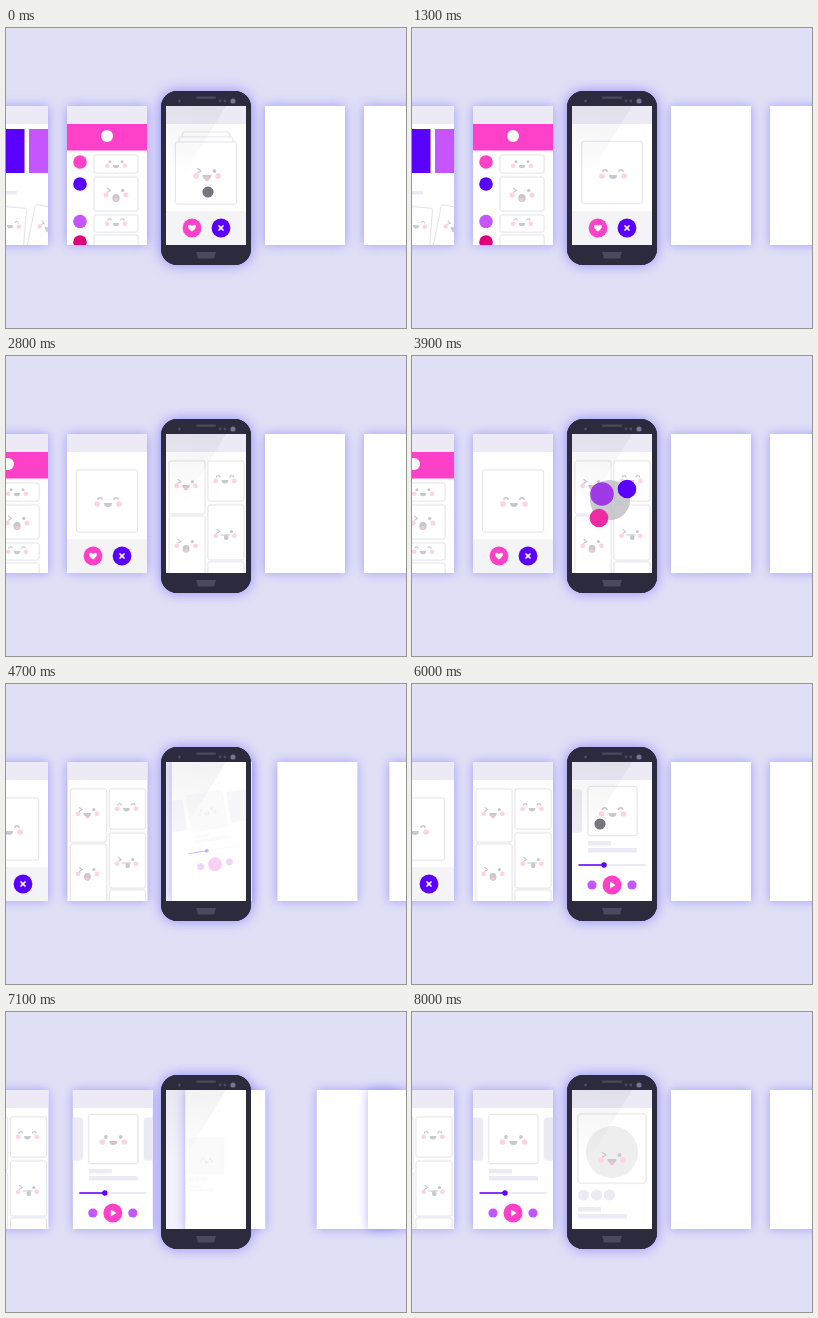
Write an HTML page with a canvas that moves like this. It is 400x300 px and loops after 8.1 s.

```html
<!DOCTYPE html>
<html lang="en">
<head>
<meta charset="utf-8">
<title>App screens</title>
<style>
html, body { margin: 0; width: 100%; height: 100%; overflow: hidden; background: #dfdff6; }
canvas { display: block; width: 100vw; height: 100vh; }
</style>
</head>
<body>
<canvas></canvas>
<script>
const LOOP = 8100, PITCH = 99, W = 80, H = 139, TOP = 78;
const PINK = '#ff40c8', BLUE = '#5a00ff', VIOLET = '#c455ff', RED = '#de0078';
const PALE = '#ecebf5', GREY = '#c9c8d0', DARK = '#2c2b3d', TRIM = '#4a4960';

// Each slide: start time and the delay of every column from left to right
const SLIDES = [
  { start: 1974, delay: [0, 56, 79, 102, 125] },
  { start: 4287, delay: [0, 56, 112, 140, 174] },
  { start: 6743, delay: [0, 56, 104, 161, 44] }
];
const SLIDE_MS = 400;

const canvas = document.querySelector('canvas');
const c = canvas.getContext('2d');
let t = 0;

const clamp = v => Math.max(0, Math.min(1, v));
const inOut = p => p < .5 ? 4 * p ** 3 : 1 - 4 * (1 - p) ** 3;
const part = (a, b) => clamp((t - a) / (b - a));
const ease = (a, b) => inOut(part(a, b));
const easeOut = (a, b) => 1 - (1 - part(a, b)) ** 3;

function group(x, y, draw, scale = 1, turn = 0, alpha = 1) {
  c.save();
  c.translate(x, y);
  c.rotate(turn);
  c.scale(scale, scale);
  c.globalAlpha *= alpha;
  draw();
  c.restore();
}

function disc(x, y, r, color, alpha = 1) {
  if (r <= 0 || alpha <= 0) return;
  c.save();
  c.globalAlpha *= alpha;
  c.fillStyle = color;
  c.beginPath();
  c.arc(x, y, r, 0, 7);
  c.fill();
  c.restore();
}

function rect(x, y, w, h, color, r = 0) {
  c.fillStyle = color;
  c.beginPath();
  c.roundRect(x, y, w, h, r);
  c.fill();
}

function tile(x, y, w, h, fill = '#fff') {
  c.save();
  c.shadowColor = 'rgba(70,65,100,.16)';
  c.shadowBlur = 2;
  rect(x, y, w, h, fill, 2);
  c.restore();
  c.strokeStyle = '#e3e2e8';
  c.lineWidth = .8;
  c.stroke();
}

function line(points, color = GREY, width = 1.3) {
  c.strokeStyle = color;
  c.lineWidth = width;
  c.lineCap = c.lineJoin = 'round';
  c.beginPath();
  points.forEach(([x, y]) => c.lineTo(x, y));
  c.stroke();
}

function halfMoon(x, y, r) {
  c.fillStyle = GREY;
  c.beginPath();
  c.arc(x, y, r, 0, Math.PI);
  c.fill();
}

function eyeArc(x, y) {
  c.strokeStyle = GREY;
  c.lineWidth = 1.4;
  c.beginPath();
  c.arc(x, y, 2.2, Math.PI, 0);
  c.stroke();
}

function face(kind, x, y, scale = 1) {
  group(x, y, () => {
    for (const side of [-1, 1]) {
      disc(side * 11, 1, 2.8, '#ffd3df');
      if (kind === 'happy') eyeArc(side * 8, -3);
      else if (side > 0 || kind === 'open') disc(side * 7.5, -4, 1.9, GREY);
      else line([[-9.5, -6.5], [-6, -4], [-9.5, -2]]);
    }
    if (kind === 'scream') {
      rect(-4, 0, 8, 9, GREY, 4);
      disc(0, 6.5, 2, '#ffc4d2');
    } else if (kind === 'tongue') {
      line([[-5, 0], [5, 0]]);
      rect(-1, 0, 5, 6, GREY, 2);
    } else {
      halfMoon(0, 0, kind === 'wink' ? 4.5 : 4);
      if (kind === 'wink') disc(0, 4, 2.2, '#e6c4d0');
    }
  }, scale);
}

const touch = (x, y, alpha) => disc(x, y, 5.6, '#77767c', alpha);
const header = () => rect(0, 0, W, 18, PALE);

function shop() {
  header();
  rect(0, 23, 56.5, 44, BLUE);
  rect(61, 23, 19, 44, VIOLET);
  rect(20, 85, 29, 3.5, PALE);
  group(40, 121, () => { tile(-17, -20, 34, 46); face('happy', 2, -2, .8); }, 1, .08);
  group(78, 123, () => { tile(-15, -22, 34, 46); face('wink', 2, -2, .8); }, 1, .2);
}

function chat() {
  header();
  rect(0, 18, W, 26.5, PINK);
  disc(40, 30, 6, '#fff');
  [[56, PINK], [78, BLUE], [115.5, VIOLET], [136, RED]].forEach(([y, color]) => disc(13, y, 6.8, color));
  [[49, 18], [71, 34], [109, 17], [129, 20]].forEach(([y, h]) => tile(27, y, 44, h));
  face('open', 49, 59, .8);
  face('scream', 49, 88, .9);
  face('happy', 49, 117, .8);
}

function dating() {
  header();
  const first = ease(130, 600), second = ease(850, 1500);
  const lead = inOut(clamp((t - 2030) / SLIDE_MS));
  for (let i = 2; i >= 0; i--) {
    const gone = [first, second, 0][i];
    const depth = Math.max(0, i - first - second);
    const inset = depth * 3.6;
    if (gone === 1) continue;
    group(40 - gone * 95, 67, () => {
      tile(-30.5 + inset, -31 - depth * 5, 61 - 2 * inset, 62);
      if (depth < 1) {
        const shift = i === 2 ? -66 * lead * (1 - lead) : 0;
        face(['wink', 'open', 'happy'][i], shift + 1, 2);
      }
    }, 1, -gone * .4);
  }
  rect(0, 105, W, 34, '#f4f4f7');
  const pulse = 1 + .15 * Math.sin(Math.PI * part(400, 600)) + .15 * Math.sin(Math.PI * part(1300, 1600));
  disc(26, 122, 9.4, PINK);
  group(26, 122, () => {
    c.fillStyle = '#fff';
    c.beginPath();
    c.moveTo(0, 3.6);
    c.bezierCurveTo(-7, -1, -3, -5.5, 0, -2);
    c.bezierCurveTo(3, -5.5, 7, -1, 0, 3.6);
    c.fill();
  });
  group(55, 122, () => {
    disc(0, 0, 9.4, BLUE);
    line([[-2, -2], [2, 2]], '#fff', 1.7);
    line([[2, -2], [-2, 2]], '#fff', 1.7);
  }, pulse);
  touch(42 - 60 * first, 86, 1 - part(400, 550));
  touch(42 - 60 * second, 86, part(750, 850) * (1 - part(1250, 1400)));
}

function board() {
  [[3, 27, 36, 53], [3, 82, 36, 60], [42, 27, 36, 40], [42, 71, 36, 55], [42, 128, 36, 20]]
    .forEach(box => tile(...box));
  face('wink', 20, 51, .85);
  face('happy', 59, 46, .85);
  face('scream', 20, 111, .85);
  face('tongue', 59, 101, .85);
}

function boardMenu() {
  const close = 1 - ease(4000, 4250);
  const open = ease(3250, 3700) * close;
  touch(38, 66, part(3100, 3200) * (1 - part(3250, 3450)));
  disc(38, 66, 5 + 15 * open, '#b9b9bf', .75 * part(3150, 3300) * close);
  const pick = ease(3600, 3900);
  [[-8, -6, 9.3 + 2.5 * pick, '#9f3ae6'], [17, -11, 9.3, BLUE], [-11, 18, 9.3, '#ee2aa4']]
    .forEach(([x, y, r, color]) => disc(38 + x * open, 66 + y * open, r * open, color));
}

function player() {
  const at = 2 + ease(5400, 5800) - ease(6200, 6650);
  [1, 2, 3].forEach(i => {
    const off = i - at, far = Math.min(1, Math.abs(off));
    group(40.5 + off * 52, 49, () => {
      tile(-24.5, -24.5, 49, 49);
      c.globalAlpha *= far;
      rect(-24.5, -24.5, 49, 49, PALE, 2);
      c.globalAlpha *= 0;
    }, 1 - .15 * far);
    group(40.5 + off * 52, 51, () => face(i === 3 ? 'happy' : 'open', 0, 0), 1, 0, 1 - far);
  });
  rect(16, 79, 23, 4.5, PALE);
  rect(16, 86, 49, 4.5, PALE);
  line([[7, 103], [73, 103]], '#e5e3f0', 1.4);
  line([[7, 103], [32, 103]], BLUE, 1.4);
  disc(32, 103, 2.7, BLUE);
  disc(20, 123, 4.6, VIOLET);
  disc(60, 123, 4.6, VIOLET);
  disc(40, 123, 9.5, PINK);
  c.fillStyle = '#fff';
  c.beginPath();
  [[38, 119.5], [43.5, 123], [38, 126.5]].forEach(([x, y]) => c.lineTo(x, y));
  c.fill();
  touch(60 - 40 * ease(5400, 5750), 62, part(5300, 5400) * (1 - part(5650, 5800)));
  touch(28 + 42 * ease(6200, 6600), 62, part(5850, 5980) * (1 - part(6500, 6650)));
}

function post() {
  tile(6, 24, 68, 69);
  const grow = easeOut(7700, 8020);
  disc(40, 62, 5 + 21 * grow, '#77767c', part(7650, 7720) * (1 - .88 * grow));
  face('wink', 40, 69);
  [11.5, 24.5, 37.5].forEach(x => disc(x, 105, 5.6, PALE));
  rect(6, 117, 23, 4.5, PALE);
  rect(6, 124, 49, 4.5, PALE);
}

// Screens with a start time grow in around a pivot
const SCREENS = [
  { draw: shop }, { draw: chat }, { draw: dating },
  { draw: board, over: boardMenu, start: 2330, pivot: [40, 70], from: .3, turn: 0 },
  { draw: player, start: 4600, pivot: [41, 49], from: .5, turn: -.3 },
  { draw: post, start: 7000, pivot: [41, 73], from: .1, turn: 0 },
  {}, {}, {}
];

function screenX(i) {
  return SLIDES.reduce((x, s, k) => {
    const lag = s.delay[Math.max(0, Math.min(4, i - 1 - k))];
    return x - PITCH * inOut(clamp((t - s.start - lag) / SLIDE_MS));
  }, 160 + PITCH * (i - 2));
}

function drawScreen(s, i) {
  const x = screenX(i);
  if (x < -100 || x > 420) return;
  c.save();
  c.shadowColor = 'rgba(88,70,255,.45)';
  c.shadowBlur = 10 * canvas.width / 400;
  rect(x, TOP, W, H, '#fff');
  c.restore();
  if (!s.draw) return;
  c.save();
  c.beginPath();
  c.rect(x, TOP, W, H);
  c.clip();
  if (s.start === undefined) group(x, TOP, s.draw);
  else {
    const p = easeOut(s.start, s.start + 550), [px, py] = s.pivot;
    group(x, TOP, header, 1, 0, part(s.start + 100, s.start + 450));
    group(Math.min(x, 160) + px, TOP + py, () => {
      c.translate(-px, -py);
      s.draw();
      if (s.over) s.over();
    }, s.from + (1 - s.from) * p, s.turn * (1 - p), part(s.start, s.start + 400));
  }
  c.restore();
}

function phoneBack() {
  c.save();
  c.shadowColor = 'rgba(88,70,255,.55)';
  c.shadowBlur = 13 * canvas.width / 400;
  rect(155, 63, 90, 174, DARK, 16);
  c.restore();
  rect(160, TOP, W, H, '#f3f2fb');
}

function phoneFront() {
  const shine = c.createLinearGradient(190, 78, 175, 150);
  shine.addColorStop(0, 'rgba(120,120,130,.09)');
  shine.addColorStop(1, 'rgba(120,120,130,0)');
  c.fillStyle = shine;
  c.beginPath();
  [[160, 78], [220, 78], [176, 150], [160, 150]].forEach(([x, y]) => c.lineTo(x, y));
  c.fill();
  c.fillStyle = DARK;
  c.beginPath();
  c.roundRect(155, 63, 90, 174, 16);
  c.rect(160, TOP, W, H);
  c.fill('evenodd');
  rect(190, 68.5, 20, 2.2, TRIM, 1);
  disc(173.5, 73, 1.5, TRIM);
  disc(214, 73, 1.4, TRIM);
  disc(219, 73, 1.4, TRIM);
  disc(227, 73, 2.6, '#77768c');
  c.fillStyle = TRIM;
  c.beginPath();
  [[190, 224], [210, 224], [208, 230.5], [192, 230.5]].forEach(([x, y]) => c.lineTo(x, y));
  c.fill();
}

function frame(now) {
  t = now % LOOP;
  const w = Math.round(innerWidth * devicePixelRatio), h = Math.round(innerHeight * devicePixelRatio);
  if (canvas.width !== w || canvas.height !== h) {
    canvas.width = w;
    canvas.height = h;
  }
  c.setTransform(w / 400, 0, 0, h / 300, 0, 0);
  rect(0, 0, 400, 300, '#dfdff6');
  phoneBack();
  SCREENS.forEach(drawScreen);
  phoneFront();
  requestAnimationFrame(frame);
}
requestAnimationFrame(frame);
</script>
</body>
</html>
```
